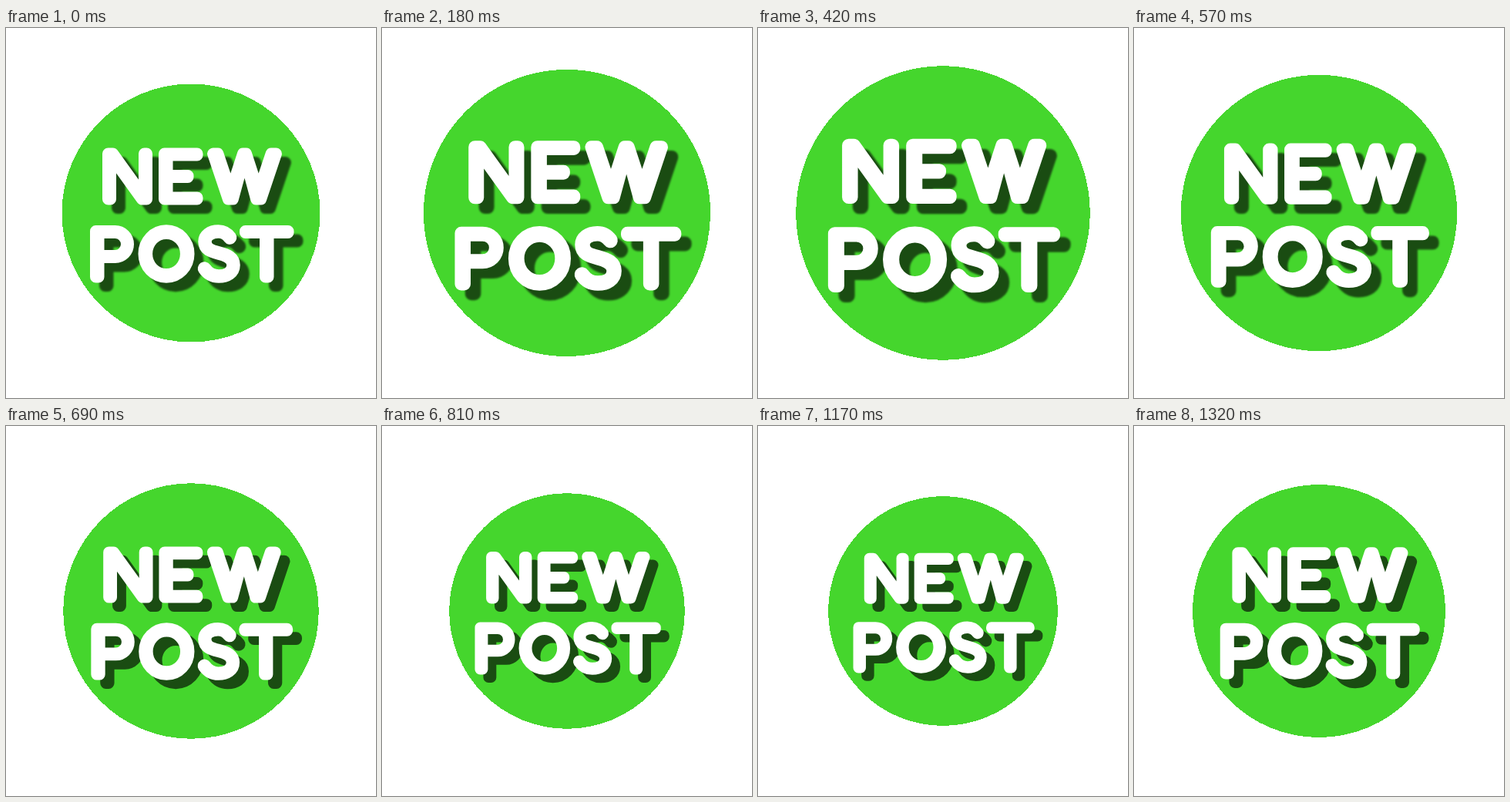
Animation, 480 px wide and 480 px high, one loop 1.35 s. Source, as an HTML page:

```html
<!DOCTYPE html>
<html lang="en">
<head>
<meta charset="utf-8">
<title>New post</title>
<style>
  html, body { margin: 0; width: 100%; height: 100%; overflow: hidden; background: #fff; }
  svg { display: block; width: 100vw; height: 100vh; }
  .disc { fill: #45d62d; shape-rendering: crispEdges; }
  .solid { fill: currentColor; fill-rule: evenodd; stroke: currentColor; stroke-width: 15; stroke-linejoin: round; }
  .line { fill: none; stroke: currentColor; stroke-linecap: round; }
  .face { color: #fff; }
  .shade { color: #1a4c12; filter: blur(.8px); }
</style>
</head>
<body>
<svg viewBox="0 0 480 480" role="img" aria-label="NEW POST">
  <defs>
    <!-- Rounded lettering: thin cores widened by a round-joined outline -->
    <g id="words">
      <g class="solid">
        <path d="M132.5 163H138.5L179.5 220V163H182.5V222H176.5L135.5 165V222H132.5Z"/>
        <path d="M205.5 163H248V165H209V191.5H236V193.5H209V220H248V222H205.5Z"/>
        <path d="M268.6 163H274.8L291.4 212.5 307.5 163H311.5L327.6 212.5 344.2 163H350.4L330.6 222H324.7L309.5 166 294.3 222H288.4Z"/>
        <path d="M116.5 263.5H141.5a17 17 0 0 1 0 34H120V323H116.5Z M120 265.5V295.5H141.5a15 15 0 0 0 0-30Z"/>
        <path d="M310.5 263.5H366V265.5H340V323H336.5V265.5H310.5Z"/>
      </g>
      <ellipse class="line" cx="208" cy="293" rx="27.2" ry="28.4" stroke-width="18.6"/>
      <path class="line" stroke-width="17.5" d="M290.5 272C286.5 266.5 282 264 275.5 264C265 264 258 269.5 258 277C258 287 266 289.5 276 292C287 294.8 295 298.5 295 307.5C295 317 286.5 322 276 322C268 322 262 318.5 257.5 312"/>
    </g>
  </defs>
  <g id="badge">
    <circle class="disc" cx="240" cy="240" r="167.5"/>
    <g transform="translate(12 11.5)"><use class="shade" href="#words"/></g>
    <use class="face" href="#words"/>
  </g>
</svg>
<script>
  const LOOP = 1350, STEP = 30, RADIUS = 167.5, SWING = 25;
  const badge = document.getElementById('badge');
  const start = performance.now();

  function draw() {
    const elapsed = performance.now() - start;
    const t = Math.floor((elapsed % LOOP) / STEP) * STEP;
    const scale = 1 + SWING / RADIUS * Math.sin(2 * Math.PI * t / LOOP);
    badge.setAttribute('transform', `translate(240 240) scale(${scale}) translate(-240 -240)`);
    requestAnimationFrame(draw);
  }
  draw();
</script>
</body>
</html>
```
